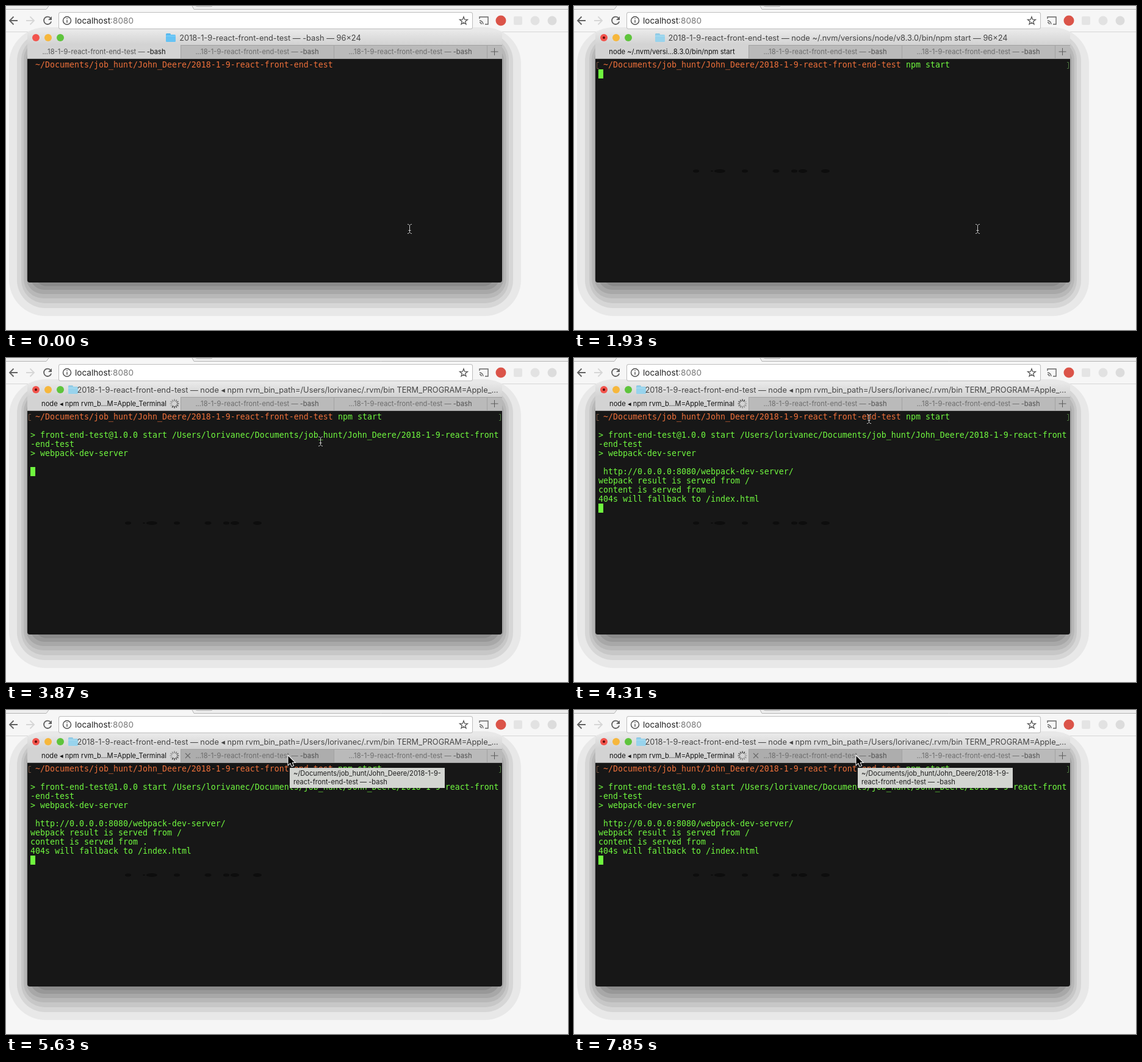
An HTML page with a canvas for the animation above (8 s loop, 921 by 532 pixels).

```html
<!DOCTYPE html>
<html lang="en">
<head>
<meta charset="utf-8">
<title>Starting a dev server</title>
<style>
html, body { margin: 0; width: 100%; height: 100%; overflow: hidden; background: #f6f6f6; }
canvas { display: block; }
</style>
</head>
<body>
<canvas id="stage" width="921" height="532"></canvas>
<script>
const LOOP = 8000, STEP = 148.15;
const ctx = document.getElementById('stage').getContext('2d');
const UI = 'Inter, "Open Sans", sans-serif';
const MONO = '13.29px "DejaVu Sans Mono", monospace';
const GREEN = '#70f83f', ORANGE = '#ee703a';
const DIR = '2018-1-9-react-front-end-test';
const CWD = '~/Documents/job_hunt/John_Deere/' + DIR;

// Steps at which the session changes.
const AT = { focus: 1, recall: 3, blink: 7, command: 9, enter: 12, node: 13, npm: 16, served: 29, tooltip: 37 };
const POINTER = [[15, 661, 366], [19, 671.5, 192], [23, 546, 154], [26, 515, 137], [31, 462, 75]];

const NPM_OUTPUT = [
  '> front-end-test@1.0.0 start /Users/lorivanec/Documents/job_hunt/John_Deere/2018-1-9-react-front',
  '-end-test',
  '> webpack-dev-server'
];
const SERVER_OUTPUT = [
  ' http://0.0.0.0:8080/webpack-dev-server/',
  'webpack result is served from /',
  'content is served from .',
  '404s will fallback to /index.html'
];

function rect(x, y, w, h, fill) {
  ctx.fillStyle = fill;
  ctx.fillRect(x, y, w, h);
}

function rounded(x, y, w, h, radius, fill) {
  ctx.beginPath();
  ctx.roundRect(x, y, w, h, radius);
  ctx.fillStyle = fill;
  ctx.fill();
}

function ellipse(x, y, rx, ry, fill) {
  ctx.beginPath();
  ctx.ellipse(x, y, rx, ry, 0, 0, 7);
  ctx.fillStyle = fill;
  ctx.fill();
}

function stroke(path, color, width = 1) {
  ctx.strokeStyle = color;
  ctx.lineWidth = width;
  ctx.stroke(new Path2D(path));
}

function text(str, x, y, font, fill, align = 'left') {
  ctx.font = font;
  ctx.fillStyle = fill;
  ctx.textAlign = align;
  ctx.fillText(str, x, y);
}

// Draws [string, color] runs as one line centred on x.
function centredRuns(runs, x, y, font) {
  ctx.font = font;
  x -= ctx.measureText(runs.map(r => r[0]).join('')).width / 2;
  for (const [str, color] of runs) {
    text(str, x, y, font, color);
    x += ctx.measureText(str).width;
  }
}

const term = (str, col, row, color = GREEN) => text(str, 40 + col * 8, 86 + row * 15, MONO, color);
const caret = (col, row) => rect(40 + col * 8, 74 + row * 15, 8, 15, GREEN);

function shadow() {
  const bands = [
    [5, 35, 509, 60, 232], [18, 44, 496, 46, 214], [25, 50, 488, 38, 199], [29, 56, 480, 32, 184],
    [33, 62, 473, 28, 168], [39, 68, 466, 24, 152], [47, 74, 460, 20, 138]
  ];
  for (const [x, top, bottom, radius, grey] of bands)
    rounded(x, top, 849 - 2 * x, bottom - top, radius, `rgb(${grey},${grey},${grey})`);
}

function browser() {
  rect(0, 0, 921, 532, '#f6f6f6');
  rect(0, 0, 921, 5, '#eeeeee');
  ctx.fillStyle = '#f6f6f6';
  ctx.fill(new Path2D('M66 6L70 0H305L308 6Z'));
  stroke('M0 5.5H66L70 0M305 0L308 5.5H921', '#b4b4b4');
  stroke('M311 0Q312 .8 315 .8H334Q338 .8 338 0', '#b4b4b4');
  rect(0, 42, 921, 1, '#d6d6d6');
  shadow();

  rounded(86, 10, 679, 28, 3.5, '#bdbdbd');
  rounded(87, 11, 677, 26, 2.5, '#fff');
  const arrow = 'M19 24H6M12.5 17.5L6 24L12.5 30.5';
  stroke(arrow, '#626262', 1.8);
  ctx.save();
  ctx.translate(52, 0);
  ctx.scale(-1, 1);
  stroke(arrow, '#d6d6d6', 1.8);
  ctx.restore();
  stroke('M73.2 20A6.2 6.2 0 1 0 74.2 25.5', '#626262', 1.8);
  ctx.fillStyle = '#626262';
  ctx.fill(new Path2D('M75 17V23H69Z'));

  stroke('M106.5 24A6.5 6.5 0 1 1 93.5 24A6.5 6.5 0 1 1 106.5 24M100 23V27.5M100 20V21.5', '#4a4a4a', 1.4);
  text('localhost', 113, 28.5, '13.6px ' + UI, '#222');
  const hostWidth = ctx.measureText('localhost').width;
  text(':8080', 113 + hostWidth, 28.5, '13.6px ' + UI, '#777');

  let star = '';
  for (let i = 0; i < 10; i++) {
    const r = i % 2 ? 2.8 : 6.8, a = i * Math.PI / 5;
    star += `${i ? 'L' : 'M'}${750 + r * Math.sin(a)} ${24.5 - r * Math.cos(a)}`;
  }
  stroke(star + 'Z', '#555', 1.3);

  stroke('M776 21V18H790V30H785M776 24A6 6 0 0 1 782 30M776 27A3 3 0 0 1 779 30', '#666', 1.4);
  ellipse(811, 24, 8.5, 8.5, '#db5449');
  rounded(832, 17, 14, 14, 2, '#e4e4e4');
  ellipse(867, 24, 7.5, 7.5, '#e2e2e2');
  ellipse(895, 24, 7.5, 7.5, '#dcdcdc');
}

function folder(x, pale) {
  rounded(x, 45, 8, 5, 1.5, pale ? '#8cc8e4' : '#52b5ec');
  rounded(x, 47, 16, 12, 1.5, pale ? '#98d3ec' : '#66c3f4');
  rect(x, 49, 16, 1, pale ? '#a9dcf1' : '#7dcef8');
}

function spinner(k) {
  for (let i = 0; i < 12; i++) {
    const a = i * Math.PI / 6, age = (2 * k - i + 1200) % 12;
    const c = Math.cos(a), s = Math.sin(a);
    stroke(`M${276 + 4 * c} ${75 + 4 * s}L${276 + 7.5 * c} ${75 + 7.5 * s}`,
      `rgba(40,40,40,${0.9 - age * 0.06})`, 1.5);
  }
}

function titleBar(k) {
  const shade = ctx.createLinearGradient(0, 41, 0, 64);
  shade.addColorStop(0, '#e8e8e8');
  shade.addColorStop(1, '#d2d2d2');
  rounded(35, 41, 778, 24, [5, 5, 0, 0], shade);
  ['#f2544d', '#f6b73c', '#5ec43c'].forEach((color, i) => ellipse(49 + 20 * i, 52, 6, 6, color));
  if (k >= AT.node) ellipse(49, 52, 2, 2, '#5a0a08');

  let title = ' — -bash — 96×24', x = 262, centre = 433;
  if (k >= AT.npm) {
    title = ' — node ◂ npm rvm_bin_path=/Users/lorivanec/.rvm/bin TERM_PROGRAM=Apple_…';
    x = 102; centre = 461.5;
  } else if (k >= AT.node) {
    title = ' — node ~/.nvm/versions/node/v8.3.0/bin/npm start — 96×24';
    x = 133; centre = 432.5;
  }
  folder(x, k >= AT.node);
  text(DIR + title, centre, 57, '12.8px ' + UI, '#454545', 'center');
}

function tabs(k, hover) {
  const font = '11.2px ' + UI, idle = '...18-1-9-react-front-end-test — ';
  rect(35, 64, 778, 23, '#a2a2a2');
  rect(35, 64, 251, 22, '#d3d3d3');
  rect(287, 65, 250, 21, hover ? '#adadad' : '#bababa');
  rect(538, 65, 250, 21, '#bababa');
  rect(789, 65, 24, 21, '#bababa');

  let active = [[idle, '#555'], ['-bash', '#111']];
  if (k >= AT.npm) active = [['node ◂ npm rvm_b...M=Apple_Terminal', '#111']];
  else if (k >= AT.node) active = [['node ~/.nvm/versi...8.3.0/bin/npm start', '#111']];
  centredRuns(active, 160.5, 79, font);
  for (const x of [411.5, 662.5]) centredRuns([[idle, '#6c6c6c'], ['-bash', '#505050']], x, 79, font);
  stroke('M800.5 69V81M794.5 75H806.5', '#5c5c5c');
  if (hover) stroke('M294 71L302 79M302 71L294 79', '#686868', 1.1);
  if (k >= AT.npm) spinner(k);
}

function terminal(k) {
  rounded(35, 87, 778, 367, [0, 0, 4, 4], '#171717');
  if (k >= AT.focus)
    for (const [x, r] of [[200, 5], [226, 2], [239, 9], [280, 5], [331, 5.5], [361, 5], [375, 7], [412, 7]])
      ellipse(x, 271, r, Math.min(r / 2, 3), '#0d0d0d');

  term(CWD, 1, 1, ORANGE);
  if (k >= AT.command) term('npm start', 63, 1);
  else if (k >= AT.recall) term('clear', 63, 1);

  if (k >= AT.enter) {
    stroke('M41 92.5H37.5V102.5H41', '#745443');
    stroke('M808 92.5H810.5V102.5H808', '#4c753f');
  }
  if (k >= AT.npm) NPM_OUTPUT.forEach((line, i) => term(line, 0, 3 + i));
  if (k >= AT.served) SERVER_OUTPUT.forEach((line, i) => term(line, 0, 7 + i));

  // The caret blinks four steps on, four off, restarting on output.
  const lit = since => (k - since) % 8 < 4;
  if (k >= AT.served) { if (lit(AT.served)) caret(0, 11); }
  else if (k >= AT.npm) { if (lit(AT.npm)) caret(0, 7); }
  else if (k >= AT.enter) caret(0, 2);
  else if (k >= AT.command) caret(72, 1);
  else if (k >= AT.recall) { if (k < AT.blink) caret(68, 1); }
  else if (k >= AT.focus) caret(63, 1);
}

function pointerAt(k) {
  const next = POINTER.findIndex(p => p[0] > k);
  if (next === 0) return POINTER[0].slice(1);
  if (next < 0) return POINTER.at(-1).slice(1);
  const [k0, x0, y0] = POINTER[next - 1], [k1, x1, y1] = POINTER[next];
  const f = (k - k0) / (k1 - k0);
  return [x0 + (x1 - x0) * f, y0 + (y1 - y0) * f];
}

function pointer(x, y, isArrow) {
  ctx.save();
  ctx.translate(Math.round(x), Math.round(y));
  if (isArrow) {
    const shape = 'M.5 .5V15L4 11.8L6.4 17.2L8.8 16.2L6.5 10.9H11Z';
    stroke(shape, '#fff', 2);
    ctx.fillStyle = '#000';
    ctx.fill(new Path2D(shape));
  } else {
    stroke('M-3 -7.5H-1.5L.5 -5.5L2.5 -7.5H4M.5 -5.5V5.5M-3 7.5H-1.5L.5 5.5L2.5 7.5H4M-1.5 2.5H2.5', '#c9c9c9');
  }
  ctx.restore();
}

function tooltip() {
  const font = '11.1px ' + UI;
  rect(465, 95, 254, 33, '#d3d5d1');
  text('~/Documents/job_hunt/John_Deere/2018-1-9-', 471, 108, font, '#1c1c1c');
  text('react-front-end-test — -bash', 471, 122, font, '#1c1c1c');
}

function frame(now) {
  const k = Math.floor((now % LOOP) / STEP + 0.03);
  const [x, y] = pointerAt(k), hover = y < 87;
  browser();
  titleBar(k);
  tabs(k, hover);
  terminal(k);
  if (k >= AT.tooltip) tooltip();
  pointer(x, y, hover);
  requestAnimationFrame(frame);
}

const start = performance.now();
requestAnimationFrame(() => frame(0));
const realFrame = frame;
frame = now => realFrame(Math.max(0, now - start));
</script>
</body>
</html>
```
